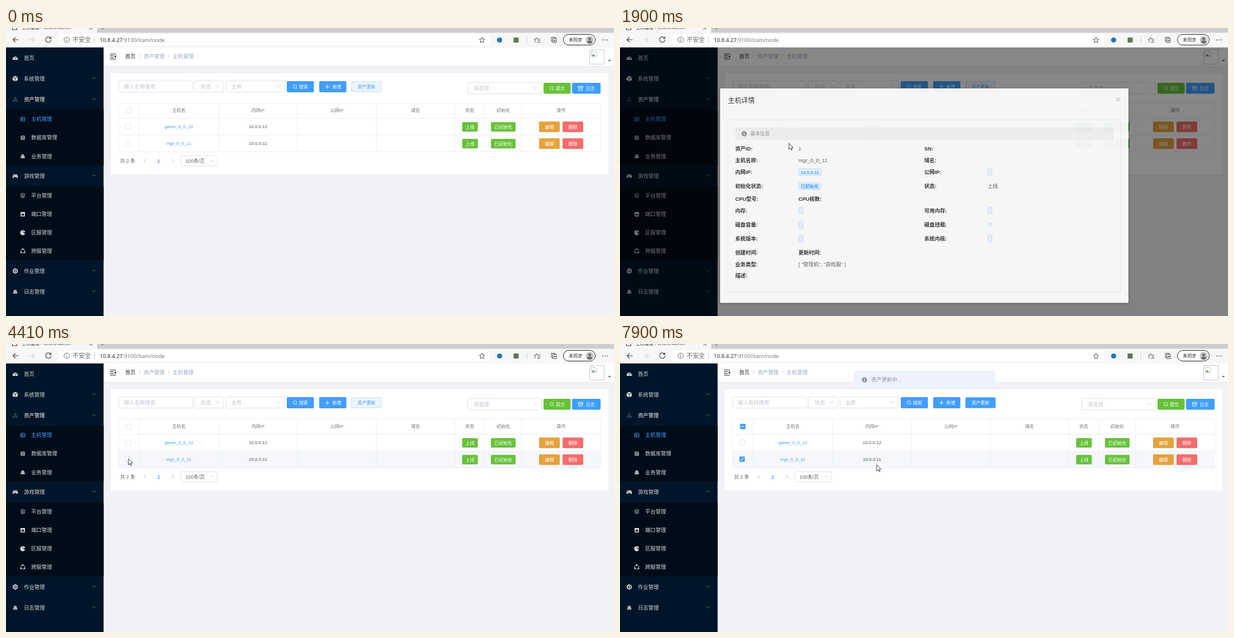
Write an HTML page that moves like this. It is 1087 px wide and 515 px high and loops after 7.99 s.

```html
<!DOCTYPE html>
<html lang="zh-CN">
<head>
<meta charset="utf-8">
<title>主机管理</title>
<style>
html, body { margin: 0; width: 100%; height: 100%; overflow: hidden; background: #f0f2f5; }
svg { display: block; width: 1087px; height: 515px; }
text { font-family: "Liberation Sans", "Noto Sans CJK SC", "Noto Sans CJK", sans-serif; white-space: pre; }
text.ui { font-family: "Open Sans", "Noto Sans CJK SC", "Noto Sans CJK", sans-serif; }
.panel { filter: drop-shadow(0 1px 2px rgba(0, 0, 0, .3)); }
</style>
</head>
<body>
<svg id="stage" viewBox="0 0 1087 515" xmlns="http://www.w3.org/2000/svg"></svg>
<script>
const BLUE = '#409eff', GREEN = '#67c23a', ORANGE = '#e6a23c', RED = '#f56c6c';
const DARK = '#303133', GREY = '#606266', HINT = '#c0c4cc', LINE = '#ebeef5', EDGE = '#dcdfe6';
const MENU = '#d3d9df';

// ---------- markup helpers ----------
const rect = (x, y, w, h, fill, extra = '') =>
  `<rect x="${x}" y="${y}" width="${w}" height="${h}" fill="${fill}" ${extra}/>`;
const text = (x, yc, str, size, fill, extra = '') =>
  `<text x="${x}" y="${(yc + size * 0.37).toFixed(2)}" font-size="${size}" fill="${fill}" ${extra}>${str}</text>`;
const mid = (x, yc, str, size, fill, extra = '') =>
  text(x, yc, str, size, fill, 'text-anchor="middle" ' + extra);
const line = (d, color, w = 1, extra = '') =>
  `<path d="${d}" fill="none" stroke="${color}" stroke-width="${w}" ${extra}/>`;
const shape = (d, fill) => `<path d="${d}" fill="${fill}"/>`;
const circle = (x, y, r, fill, extra = '') => `<circle cx="${x}" cy="${y}" r="${r}" fill="${fill}" ${extra}/>`;
const at = (x, y, body) => `<g transform="translate(${x} ${y})">${body}</g>`;
const group = (id, body, extra = '') => `<g id="${id}" ${extra}>${body}</g>`;
const box = (x, y, w, h, fill, stroke, r = 2.5) =>
  rect(x + .5, y + .5, w - 1, h - 1, fill, `rx="${r}" stroke="${stroke}" stroke-width=".9"`);
const chevron = (x, y, color, up = 1, s = 3) =>
  line(`M${x - s} ${y - up * s / 2}l${s} ${up * s}l${s} ${-up * s}`, color, .9);
const lens = (x, y) => circle(x, y - .4, 3, 'none', 'stroke="#fff" stroke-width=".9"') +
  line(`M${x + 2.2} ${y + 1.8}l1.7 1.7`, '#fff', .9);
const info = (x, y) => circle(x, y, 4.7, '#909399') +
  rect(x - .6, y - 2.8, 1.3, 1.3, '#fff') + rect(x - .6, y - .8, 1.3, 3.5, '#fff');
const button = (x, y, w, h, fill, label, labelX) =>
  rect(x, y, w, h, fill, 'rx="2"') + mid(labelX ?? x + w / 2, y + h / 2, label, 8, '#fff', 'font-weight="500"');
const select = (x, y, w, label, labelX) => box(x, y, w, 21, '#fff', EDGE) +
  text(labelX, y + 10.5, label, 9.33, HINT) + chevron(x + w - 11.5, y + 10, HINT, 1, 3.5);

// ---------- browser ----------
function browser() {
  const ink = '#3b3b3b', star = 'M0 -4.8L1.4 -1.6L4.8 -1.3L2.2 1L3 4.4L0 2.6L-3 4.4L-2.2 1L-4.8 -1.3L-1.4 -1.6Z';
  return rect(0, 0, 1087, 34.5, '#f7f7f7') + rect(163, 0, 924, 8.5, '#cdcdcd') +
    line('M11.5 -4V3H19.5V-4', ink, 1.1) +
    text(28, -.7, '主机管理 - Velora Admin', 8, '#333', 'class="ui"') +
    line('M149 -3l6 6M155 -3l-6 6', ink, .9) + line('M169.5 -.3h6M172.5 -3v6', '#555', .9) +
    line('M22.5 21H12.5M17 16.5L12.5 21L17 25.5', ink, 1.1) +
    line('M41 21H51M46.500 16.500L51 21L46.500 25.500', '#d2d2d2', 1.1) +
    line('M79.300 17.500A4.900 4.900 0 1 0 80.600 21M80.300 15.500V18.700H77', ink, 1.2) +
    rect(94, 11, 771, 20, '#fff', 'rx="3"') +
    circle(108.5, 21, 4.8, 'none', 'stroke="#555" stroke-width=".9"') + line('M108.500 20.500v3M108.500 18.300v1.100', '#555', 1) +
    text(119, 21, '不安全', 10.9, '#666') + rect(158, 15.5, 1, 11, '#c8c8c8') +
    text(167.5, 21.3, '10.8.4.27<tspan fill="#6e6e6e">:9100/itam/node</tspan>', 9.7, '#1f1f1f', 'class="ui"') +
    at(851, 21.5, line(star, ink, .9)) +
    circle(882.5, 21.5, 4.6, '#1f78b8') + rect(907.5, 17, 9, 9, '#5b7a4e') +
    rect(931, 15.500, 1, 11, '#cfcfcf') +
    at(948.5, 21.5, line('M-3 4L-2.200 1L-4.500 -1.200L-1.500 -1.600L0 -4.500L1.500 -1.600H6.500M2 1.200H6.500M1 4H6.500', ink, .9)) +
    line('M977 24H975V16.500H982V18.500M977.500 18.500H984V26H977.500ZM980.800 20.300v4M978.800 22.300h4', ink, .9) +
    rect(996.5, 11.5, 57, 19, '#fff', 'rx="9.5" stroke="#222" stroke-width="1"') +
    text(1006, 21, '未同步', 8.2, '#222', 'font-weight="500"') +
    circle(1043.5, 21.3, 7, '#c4c4c4') + circle(1043.500, 19.300, 2.500, '#717171') + shape('M1038.700 26.300a4.800 4 0 0 1 9.600 0a7 7 0 0 1 -9.600 0Z', '#717171') +
    [1067, 1071, 1075].map(x => circle(x, 21.3, .9, ink)).join('');
}

// ---------- sidebar ----------
const icons = {
  gauge: c => shape('M-4.800 3.500A4.900 4.900 0 1 1 4.800 3.500Z', c) + line('M0 2.500L1.500 -1.500M-3.300 .5h1M2.300 .5h1M-2 -2.300l.5 .5', '#001529', .9),
  cube: c => shape('M0 -4.800L4.600 -3L0 -1.200L-4.600 -3ZM-4.600 -2.200L-.4 -.5V4.800L-4.600 2.800ZM4.600 -2.200L.4 -.5V4.800L4.600 2.800Z', c),
  frame: c => line('M0 -4.500L4.300 2.800H-4.300ZM0 -4.500V.5L4.300 2.800M0 .5L-4.300 2.800', c, .9),
  grid: c => line('M-3.800 -3.300H3.800V3.300H-3.800ZM-3.800 0H3.800M-.8 -3.300V3.300', c, .9),
  drum: c => line('M-3 -3H3V3.300H-3ZM-3 -.8H3M-3 1.300H3', c, 1),
  stack: c => shape('M-2.200 -3.200H2.200V-1.800H-2.200ZM-3 -1.200H3V.4H-3ZM-3.700 1H3.700V3.200H-3.700Z', c),
  pad: c => shape('M-3 -2H3C5 -2 5.300 3.800 3.800 3.800C2.800 3.800 2.300 2 1.500 2H-1.500C-2.300 2 -2.800 3.800 -3.800 3.800C-5.300 3.800 -5 -2 -3 -2ZM-2.500 -3.600h1.600v1h-1.600ZM1 -3.600h1.600v1H1Z', c) + line('M-3.300 .2h2M-2.300 -.8v2M1.800 .2h1', '#001529', .7),
  layers: c => line('M0 -4L4 -2L0 0L-4 -2ZM-4 .2L0 2.200L4 .2M-4 2.200L0 4.200L4 2.200', c, .8),
  port: c => rect(-4, -4, 8, 8, c, 'rx="1"') + shape('M-2.800 2.300V.5H-1.300V-1.300H1.300V.5H2.800V2.300Z', '#000c17'),
  disc: c => shape('M0 0L4.300 -1.600A4.600 4.600 0 1 0 4.300 1.600Z', c) + circle(0, -2.4, .8, '#000c17'),
  ring: c => circle(0, 0, 3.6, 'none', `stroke="${c}" stroke-width=".9"`) + circle(0, -3.6, 1.3, c) + circle(-3.2, 2.2, 1.3, c) + circle(3.2, 2.2, 1.3, c),
  gear: c => shape('M0 -4.900L4.300 -2.500V2.500L0 4.900L-4.300 2.500V-2.500Z', c) + circle(0, 0, 2.6, '#001529') + circle(0, 0, 1.5, c)
};
// [label, y, icon, depth, arrow direction]
const menu = [
  ['首页', 53.5, 'gauge', 0, 0], ['系统管理', 90.5, 'cube', 0, 1], ['资产管理', 128, 'frame', 0, -1],
  ['主机管理', 163, 'grid', 1, 0], ['数据库管理', 196, 'drum', 1, 0], ['业务管理', 229.500, 'stack', 1, 0],
  ['游戏管理', 264.500, 'pad', 0, -1],
  ['平台管理', 299.500, 'layers', 1, 0], ['端口管理', 333, 'port', 1, 0], ['区服管理', 366, 'disc', 1, 0], ['跨服管理', 399, 'ring', 1, 0],
  ['作业管理', 434.500, 'gear', 0, 1], ['日志管理', 471.500, 'stack', 0, 1]
];
function sidebar() {
  const rows = menu.map(([label, y, icon, depth, arrow]) => {
    const color = label === '主机管理' ? BLUE : label === '资产管理' ? '#fff' : MENU;
    return at(depth ? 30 : 16.5, y, icons[icon](icon === 'frame' ? '#4a5866' : color)) +
      text(depth ? 45 : 32, y, label, 9.33, color) +
      (arrow ? chevron(157.5, y - .8, '#7d8994', arrow, 2.8) : '');
  });
  return rect(0, 34.5, 174.5, 481, '#001529') + rect(0, 146, 174.5, 99.5, '#000c17') +
    rect(0, 283, 174.5, 132.5, '#000c17') + rows.join('');
}

// ---------- page ----------
function header() {
  const crumb = '#97a8be';
  return rect(174.5, 34.5, 913, 34, '#fff') + rect(174.5, 68, 913, 1, '#e4e7ea') +
    line('M186 46.500H196.500M186 49.500H192.500M186 52.500H192.500M186 55.500H196.500', '#222', 1.1) + shape('M196.700 48.300V53.700L193.700 51Z', '#222') +
    text(213, 51, '首页', 9.33, DARK) + text(237.5, 51, '/', 9.33, HINT) + text(246, 51, '资产管理', 9.33, crumb) +
    text(289.5, 51, '/', 9.33, HINT) + text(298, 51, '主机管理', 9.33, crumb) +
    box(1043, 38, 27, 27, '#fff', '#c4c4c4', 0) + line('M1046.500 41.500H1053L1056 44.500V50.500H1046.500Z', '#a9b4c4', .8) +
    shape('M1047 50.200L1050 46.500L1053.500 50.200Z', '#5aa54a') + shape('M1076.300 57h5.400l-2.700 3Z', GREY);
}

function filters() {
  return box(201, 94, 133, 21, '#fff', EDGE) + text(211, 104.500, '输入名称搜索', 9.33, HINT) +
    select(336, 94, 53.5, '状态', 348) + select(393, 94, 106, '业务', 403) +
    button(502, 95, 48.5, 20, BLUE, '搜索', 532) + lens(516.5, 105) +
    button(560, 95, 48.5, 20, BLUE, '新增', 591.5) + line('M571 105h7.400M574.700 101.300v7.400', '#fff', 1) +
    box(617.5, 95.5, 54, 19, '#ecf5ff', '#b3d8ff', 2) + mid(644.500, 105, '资产更新', 8, BLUE) +
    group('updateOn', button(617.5, 95.5, 54, 19, BLUE, '资产更新')) +
    select(825, 97, 133, '请选择', 836) +
    button(961, 98, 48.5, 19.5, GREEN, '提交', 991) + lens(975.5, 107.8) +
    button(1012, 98, 51, 19.500, BLUE, '日志', 1044.500) +
    line('M1023 104.300h8.400v2.300h-8.400ZM1024 106.600v4.800h6.400v-4.800M1026 108.500h2.400', '#fff', .9);
}

const cols = [201, 238, 380, 521, 662, 802.500, 855.500, 922, 1063];
const heads = ['', '主机名', '内网IP', '公网IP', '域名', '状态', '初始化', '操作'];
const center = i => (cols[i] + cols[i + 1]) / 2;
const check = (x, y) => box(x - 5, y - 5, 10, 10, '#fff', EDGE, 1.3);

function row(i, host, ip) {
  const y = 161.5 + i * 30, c = y + 14.5;
  return group('hover' + i, rect(201, y, 862, 30, '#f5f7fa')) + check(218.3, c) +
    mid(center(1), c - .3, host, 8, BLUE) + mid(center(2), c - .3, ip, 8, '#4c4e52') +
    button(815.5, c - 7.7, 28, 17, GREEN, '上线') + button(867, c - 7.7, 44, 17, GREEN, '已初始化') +
    button(953, c - 8.7, 37, 19, ORANGE, '编辑') + button(995, c - 8.7, 37, 19, RED, '删除');
}

function table() {
  const grid = [134.500, 161.500, 191.500, 221.500].map(y => `M201 ${y}H1063`).join('') +
    cols.map(x => `M${x} 134V222`).join('');
  return heads.map((h, i) => mid(center(i), 147, h, 8, '#73767c', 'font-weight="500"')).join('') + check(219.500, 147.500) +
    row(0, 'game_0_0_12', '10.0.0.12') + row(1, 'mgr_0_0_11', '10.0.0.11') + line(grid, LINE, 1) +
    group('checked', rect(214.8, 142.800, 9.500, 9.500, BLUE, 'rx="1.300"') + line('M217 147.500h5', '#fff', 1.2) +
      rect(213.6, 201.200, 9.500, 9.500, BLUE, 'rx="1.300"') + line('M215.900 206l1.800 1.900l3.300 -3.900', '#fff', 1.1)) +
    text(204, 237.300, '共 2 条', 8.67, GREY) + line('M249.500 234.500l-2.800 2.800l2.800 2.800', '#a8abb2', .9) +
    mid(273, 237.300, '1', 8.67, BLUE, 'font-weight="700"') + line('M297.300 234.500l2.800 2.800l-2.800 2.800', '#a8abb2', .9) +
    box(312, 228, 66.5, 19, '#fff', EDGE, 2) + text(321, 237.500, '100条/页', 8.67, GREY) + chevron(369.5, 237.5, HINT, 1, 2.7);
}

// ---------- dialog ----------
function dialog() {
  const bold = (x, y, s) => text(x, y, s, 9.33, DARK, 'font-weight="600"');
  const plain = (x, y, s) => text(x, y, s, 9.33, GREY);
  const tag = (x, y, w, s = '', h = 13.5) => box(x, y - h / 2, w, h, '#ecf5ff', '#c6e2ff', 2) +
    text(x + 4, y, s, 8, BLUE, 'font-weight="600"');
  const left = { '资产ID': 216.500, '主机名称': 237, '内网IP': 258, '初始化状态': 283, 'CPU型号': 306, '内存': 327,
    '磁盘容量': 352, '系统版本': 377.500, '创建时间': 402.500, '业务类型': 423, '描述': 443.500 };
  const right = { 'SN': 216.500, '域名': 237, '公网IP': 258, '状态': 283, '可用内存': 327, '磁盘挂载': 352, '系统内核': 377.500 };
  const labels = (x, set) => Object.entries(set).map(([s, y]) => bold(x, y, s + ':')).join('');
  return rect(179, 109, 730, 383.5, '#fff', 'rx="1.300" class="panel"') + text(193, 130, '主机详情', 12, DARK) +
    line('M887 125l7 7M894 125l-7 7', '#909399', .9) + box(192, 164.500, 704, 308.500, 'none', '#e6ebf5') +
    rect(206, 179, 676, 22, '#f4f4f5', 'rx="2.500"') + info(222, 190) + text(233, 190, '基本信息', 8.67, '#909399') +
    labels(206, left) + labels(544, right) + bold(319, 306, 'CPU核数:') + bold(319, 402.500, '更新时间:') +
    plain(319, 216.500, '1') + plain(319, 237, 'mgr_0_0_11') + plain(657, 283, '上线') +
    plain(319, 423, '[ "管理机", "游戏服" ]') +
    tag(319, 258.500, 41, '10.0.0.11') + tag(319, 284, 40, '已初始化') +
    [327.500, 353, 378].map(y => tag(319, y, 8.5)).join('') +
    [258.500, 327.500, 378].map(y => tag(657, y, 8.5)).join('') + tag(657, 352.500, 8.5, '', 6);
}

const notice = () => box(418, 48, 252.5, 32, '#edf2fc', LINE) + info(437, 64) + text(449, 64, '资产更新中...', 9.33, '#909399');

document.getElementById('stage').innerHTML =
  rect(0, 0, 1087, 515, '#f0f2f5') + header() + rect(187.5, 81, 889.5, 181, '#fff') + filters() + table() +
  sidebar() + group('shade', rect(0, 34.5, 1087, 481, '#000')) + browser() +
  group('dialog', dialog()) + group('notice', notice()) +
  group('arrow', `<path d="M0 0V11L2.500 8.700L4.200 12.500L6 11.700L4.300 8H7.700Z" fill="#fff" stroke="#111" stroke-width=".8" stroke-linejoin="round"/>`) +
  group('resize', line('M-1 -5.300V5.300M1.500 -5.300V5.300M-6 0H-1M1.500 0H6.500', '#111', 1) + shape('M-7.500 0l3 -2.700v5.400ZM8 0l-3 -2.700v5.400Z', '#111'));

// ---------- motion ----------
const LOOP = 7990;
const el = id => document.getElementById(id);
// stretches of pointer travel: start, end, number of steps
const strides = [[210, 1000, 11], [1080, 1080, 1], [2240, 3010, 11], [3180, 3940, 11],
  [4030, 4260, 4], [4410, 5190, 11], [5270, 5880, 9], [7520, 7900, 6]];
// pointer way points: time, x, y
const path = [
  [210, 1022, 449], [400, 820, 400], [600, 500, 290], [800, 330, 222], [910, 290, 198], [1000, 298, 206], [1080, 302, 206],
  [2160, 302, 206], [2300, 330, 215], [2600, 560, 290], [2800, 800, 345], [3010, 952, 361],
  [3260, 952, 361], [3400, 938, 361], [3425, 938, 361], [3600, 700, 300], [3800, 380, 225], [3940, 262, 205],
  [3990, 262, 205], [4260, 225, 205], [4330, 225, 205], [4420, 218, 205], [4800, 218, 205], [5190, 284, 186],
  [5230, 284, 186], [5340, 524, 148], [5425, 524, 148], [5560, 590, 125], [5880, 637, 111],
  [7450, 637, 111], [7600, 605, 130], [7900, 459, 216]
];
const dialogKeys = [[0, 0], [1850, .5], [1900, .93], [1950, .99], [2020, 1], [3250, .98], [3340, .6], [3420, .18], [3490, .04], [3560, 0]];
const shadeKeys = [[0, 0], [1850, .34], [1900, .47], [1950, .5], [3250, .46], [3340, .12], [3420, .01], [3490, 0]];

const held = (keys, t) => keys.filter(k => k[0] <= t).pop()[1];
const within = (t, ...spans) => spans.some(([a, b]) => t >= a && t < b);
const show = (id, on) => el(id).setAttribute('visibility', on ? 'visible' : 'hidden');
const place = (id, x, y) => el(id).setAttribute('transform', `translate(${x} ${y})`);
const fade = (id, v) => { el(id).setAttribute('opacity', v); show(id, v > 0); };

function stepTime(t) {
  const stride = strides.filter(s => s[0] <= t).pop();
  if (!stride) return 0;
  const [a, b, n] = stride, step = (b - a) / (n - 1 || 1);
  return step ? Math.min(b, a + Math.floor((t - a) / step + 1e-6) * step) : a;
}

function pointer(t) {
  const i = path.findIndex(p => p[0] > t);
  if (i < 0) return path[path.length - 1].slice(1);
  if (!i) return path[0].slice(1);
  const [t0, x0, y0] = path[i - 1], [t1, x1, y1] = path[i], k = (t - t0) / (t1 - t0);
  return [x0 + (x1 - x0) * k, y0 + (y1 - y0) * k];
}

function draw(t) {
  const [x, y] = pointer(stepTime(t)), sizing = within(t, [5346, 5422]);
  place('arrow', x, y);
  place('resize', x, y);
  show('arrow', t >= 210 && !sizing);
  show('resize', sizing);

  show('hover0', within(t, [4950, 5500]));
  show('hover1', within(t, [1540, 1850], [3860, 4950], [7820, LOOP]));
  show('checked', t >= 4480);
  show('updateOn', t >= 5720);

  const open = held(dialogKeys, t);
  fade('dialog', open);
  place('dialog', 0, -13.3 * (1 - open));
  fade('shade', held(shadeKeys, t));

  const p = t < 6830 ? 0 : Math.min(1, (Math.floor((t - 6830) / 75) + 1) / 5);
  const slide = 1 - (1 - p) ** 2;
  fade('notice', slide);
  place('notice', 0, -32 * (1 - slide));
}

let start;
function tick(now) {
  start ??= now;
  draw((now - start) % LOOP);
  requestAnimationFrame(tick);
}
draw(0);
requestAnimationFrame(tick);
</script>
</body>
</html>
```
